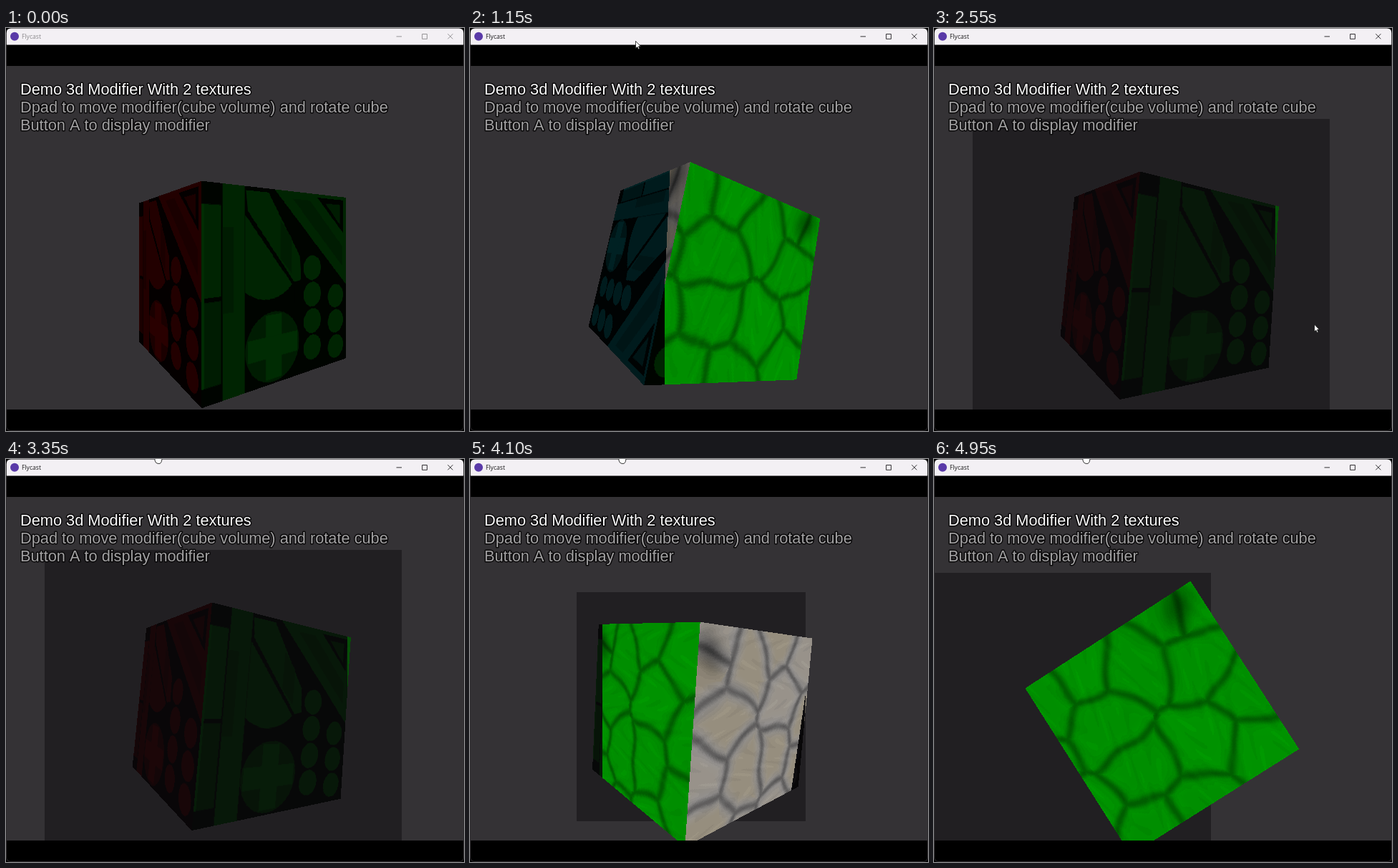
Recreate the animation shown at these times as an HTML page with a canvas. Size 640 px wide and 563 px high, loop 5000 ms.

```html
<!DOCTYPE html>
<html lang="en">
<head>
<meta charset="utf-8">
<title>Modifier volume demo</title>
<style>
  html, body { margin: 0; width: 100%; height: 100%; overflow: hidden; background: #000; }
  canvas, svg { position: absolute; left: 0; top: 0; width: 640px; height: 563px; }
  .demo { font: 21.75px "Liberation Sans", Arial, sans-serif; font-kerning: none; fill: #a2a1a2;
          stroke: #0b0a0b; stroke-width: 3px; stroke-linejoin: round; paint-order: stroke; }
  .title { font: 8.6px "Open Sans", "Noto Sans", sans-serif; }
</style>
</head>
<body>
<canvas id="view" width="640" height="563"></canvas>
<svg viewBox="0 0 640 563">
  <path d="M.7 23.4V7Q.7 .6 7 .6H633Q639.3 .6 639.3 7V23.4Z" fill="#f3f0f4"/>
  <path d="M.5 24V556Q.5 562.5 7 562.5H633Q639.5 562.5 639.5 556V24" fill="none" stroke="#2c2a2d"/>
  <circle cx="12" cy="11.7" r="6" fill="#5a3aa8"/>
  <g id="bar">
    <text class="title" x="22" y="15" stroke="none">Flycast</text>
    <path d="M545.5 11.9H553M581.6 8.5H588.4V15.3H581.6ZM617.3 8.2L624.4 15.3M624.4 8.2L617.3 15.3" fill="none" stroke-width=".9"/>
  </g>
  <g class="demo">
    <text x="20" y="93" style="fill:#fafafa">Demo 3d Modifier With 2 textures</text>
    <text x="20" y="118">Dpad to move modifier(cube volume) and rotate cube</text>
    <text x="20" y="143">Button A to display modifier</text>
  </g>
  <path id="arrow" d="M.5 .3V10.4L2.8 8.4L4.4 11.8L6 11.1L4.5 7.7H7.6Z" fill="#fff" stroke="#111" stroke-width=".8"/>
  <path id="hand" d="M208 -2V2Q209 6 212 6.4H215Q218 5 218 -2Z" fill="#fff" stroke="#222" stroke-width=".9"/>
</svg>
<script>
const LOOP = 5000, STEP = 50;
const FOCAL = 415.7, CX = 320, CY = 293, DEPTH = 4, LOW = -0.5;
const YAW = 0.576, HALF = 1.5, TOP = 53, BOTTOM = 533, TEX = 256;
const BG = [52, 50, 53], VEIL = [14, 12, 15];
const VEIL_ON = 2450, ROAM = 2150, ROAM_END = 3350;

// Runs p from 0 to 1 while t goes from a to b
const ramp = (t, a, b) => Math.max(0, Math.min(1, (t - a) / (b - a)));
const smooth = x => { const p = ramp(x, 0, 1); return p * p * (3 - 2 * p); };

// Volume offset: a swing left, right and back, then a slow slide left
const sideAt = t => -2.3 * ramp(t, 850, 1233) + 2.95 * ramp(t, 1233, 1725)
  - 0.75 * ramp(t, 1725, 1850) - 0.9 * ramp(t, 4550, 4950);
const awayAt = t => 1.8 * ramp(t, 3750, 4200) - 1.2 * ramp(t, 4200, 4500);

function mouseAt(t) {
  const a = 2 * Math.PI * ramp(t, ROAM, ROAM_END), sweep = 1 - Math.cos(a);
  return [231 + 200 * sweep, 18 + 235 * sweep + 50 * Math.sin(a)];
}

// Stone centres; the cracks are the borders between nearest centres
const stones = [[.2, .45], [.36, .18], [.72, .38], [.39, .75], [.67, .72], [.09, .05], [.05, .2], [.62, .04],
  [.9, .14], [.98, .55], [.94, .83], [.06, .72], [.1, .95], [.42, 1.17], [.73, 1.06]];

function stoneColor(x, y) {
  const u = x + .012 * Math.sin(23 * y + 5 * x), v = y + .012 * Math.sin(19 * x + 1);
  const [a, b] = stones
    .map(([sx, sy], id) => ({ sx, sy, id, d: (u - sx) ** 2 + (v - sy) ** 2 }))
    .sort((p, q) => p.d - q.d);
  const edge = (b.d - a.d) / (2 * Math.hypot(a.sx - b.sx, a.sy - b.sy));
  const grain = .03 * Math.sin(31 * x + 9 * Math.sin(13 * y)) * Math.sin(27 * y);
  const stain = 1 - .4 * Math.exp(-120 * ((u - .07) ** 2 + (v - .13) ** 2));
  const raw = (.62 + .27 * smooth(edge / .035) + .11 * smooth(edge / .08) + grain) * stain;
  const light = Math.round(raw * 24) / 24;
  const warm = smooth(edge / .09) * (a.id % 3 === 2 ? .5 : 1);
  return [153 - 3 * warm, 151 - 9 * warm, 151 - 25 * warm].map(c => c * light);
}

function stoneTexture() {
  const data = new Uint8ClampedArray(TEX * TEX * 4);
  for (let y = 0; y < TEX; y++)
    for (let x = 0; x < TEX; x++) data.set(stoneColor(x / TEX, y / TEX), (y * TEX + x) * 4);
  return data;
}

function metalTexture() {
  const mid = "#222424", dim = "#1a1c1c", lit = "#292c2c", dark = "#040404";
  const c = document.createElement("canvas");
  c.width = c.height = TEX;
  const g = c.getContext("2d");
  g.scale(TEX, TEX);
  const rect = (color, x, y, w, h) => { g.fillStyle = color; g.fillRect(x, y, w, h); };
  const disc = (color, x, y, r) => {
    g.beginPath();
    g.arc(x, y, r, 0, 7);
    g.fillStyle = color;
    g.fill();
  };
  const poly = (color, ...p) => {
    g.beginPath();
    for (let i = 0; i < p.length; i += 2) g.lineTo(p[i], p[i + 1]);
    g.fillStyle = color;
    g.fill();
  };
  // Side panels and the large column
  rect(dark, 0, 0, 1, 1);
  rect(mid, 0, .1, .1, .42);
  rect(dim, 0, .54, .1, .38);
  rect(lit, 0, .1, .012, .82);
  rect(mid, .108, 0, .125, 1);
  rect(dim, .108, .2, .06, .4);
  // Fan cut by the diagonal
  g.save();
  poly(dark, .235, .14, .56, .52, .56, .6, .235, .6);
  g.clip();
  disc(mid, .38, .33, .235);
  g.restore();
  // Diagonal plates
  poly(mid, .24, .02, .38, .02, .6, .35, .61, .48, .56, .49, .25, .12);
  poly(dim, .46, .16, .54, .25, .54, .44, .46, .36);
  poly(mid, .42, 0, 1, 0, 1, .54);
  poly(dim, .55, .04, .68, .04, .96, .3, .96, .42);
  poly(dark, .74, .02, .97, .02, .97, .22);
  poly(dim, .81, .05, .94, .05, .94, .17);
  // Disc with a cross
  disc(dim, .415, .81, .18);
  rect(lit, .36, .645, .11, .33);
  rect(lit, .25, .755, .33, .11);
  for (let i = 0; i < 7; i++) {
    const far = i > 3;
    disc(mid, far ? .9 : .7, far ? .6 + (i - 4) * .152 : .42 + i * .15, .07);
  }
  return g.getImageData(0, 0, TEX, TEX).data;
}

const stone = stoneTexture(), metal = metalTexture();

// Tints per face: outside the volume, inside the volume
const faces = {
  front: [[0, 1, 0], [0, 1, .06]],
  back: [[1, 1, 0], [1, 1, 0]],
  left: [[1, 0, 0], [1, 0, 0]],
  right: [[1, 1, 1], [.4, .4, .4]],
  top: [[1, 1, 1], [.7, .3, .7]],
  bottom: [[.62, .62, .62], [0, .75, .8]]
};

// Face and texture position of a cube point, seen along d
function locate(axis, d, [x, y, z]) {
  const flip = d[axis] > 0 ? 1 : -1;
  if (axis === 0) return [flip > 0 ? "left" : "right", -flip * z, -y];
  if (axis === 1) return [flip > 0 ? "bottom" : "top", x, flip * z];
  return [flip > 0 ? "front" : "back", flip * x, -y];
}

const ctx = document.getElementById("view").getContext("2d");
const img = ctx.createImageData(640, BOTTOM - TOP);
const within = (v, middle) => Math.abs(v - middle) < HALF;
const cell = w => Math.max(0, Math.min(TEX - 1, (w + 1) * TEX / 2 | 0));

function render(side, away, veil) {
  const px = img.data, yaw = YAW - away;
  const c = Math.cos(yaw), s = Math.sin(yaw), cr = Math.cos(side), sr = -Math.sin(side);
  const toCube = (x, y, z) => {
    const a = x * c + z * s;
    return [a * cr - y * sr, a * sr + y * cr, z * c - x * s];
  };
  const eye = toCube(0, -LOW, -DEPTH);
  const front = DEPTH + away - HALF;
  for (let y = TOP, o = 0; y < BOTTOM; y++) {
    for (let x = 0; x < 640; x++, o += 4) {
      const dx = (x + .5 - CX) / FOCAL, dy = (CY - y - .5) / FOCAL;
      let color = BG, depth = Infinity;
      if (x > 125 && x < 530 && y > 150) {
        const d = toCube(dx, dy, 1);
        let near = 0, far = Infinity, axis = 0;
        for (let i = 0; i < 3; i++) {
          const m = -eye[i] / d[i], h = Math.abs(1 / d[i]);
          if (m - h > near) { near = m - h; axis = i; }
          far = Math.min(far, m + h);
        }
        if (near < far) {
          depth = near;
          const [face, u, v] = locate(axis, d, eye.map((e, i) => e + d[i] * near));
          const inside = within(dx * near, side) && within(dy * near, LOW) && within(near, DEPTH + away);
          const tex = inside ? metal : stone, k = (cell(v) * TEX + cell(u)) * 4;
          color = faces[face][+inside].map((tint, i) => tint * tex[k + i]);
        }
      }
      const veiled = veil && depth > front && within(dx * front, side) && within(dy * front, LOW);
      for (let i = 0; i < 3; i++) px[o + i] = veiled ? (color[i] + VEIL[i]) / 2 : color[i];
      px[o + 3] = 255;
    }
  }
  ctx.putImageData(img, 0, TOP);
}

const [bar, arrow, hand] = ["bar", "arrow", "hand"].map(id => document.getElementById(id));
let pose = "", last = -1;

function draw(t) {
  const side = sideAt(t), away = awayAt(t), veil = t >= VEIL_ON;
  const next = [side, away, veil].join();
  if (next !== pose) { render(side, away, veil); pose = next; }
  const ink = t < 250 ? "#8b898c" : "#1c1b1d";
  bar.setAttribute("fill", ink);
  bar.setAttribute("stroke", ink);
  arrow.setAttribute("transform", `translate(${mouseAt(t)})`);
  arrow.style.display = t >= 400 && t < ROAM_END ? "" : "none";
  hand.style.display = t >= ROAM_END ? "" : "none";
}

const start = performance.now();
function tick() {
  const t = Math.floor((performance.now() - start) % LOOP / STEP) * STEP;
  if (t !== last) { draw(t); last = t; }
  requestAnimationFrame(tick);
}
tick();
</script>
</body>
</html>
```
